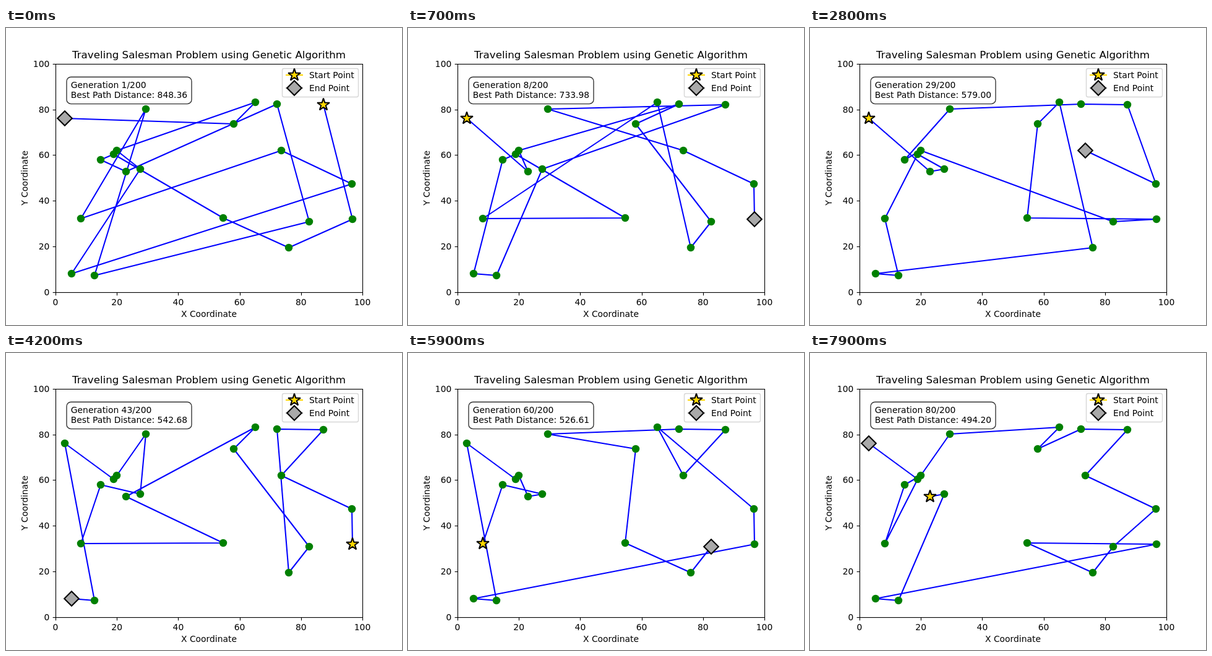
An HTML page with a canvas that plays this animation: 640 px wide and 480 px high, repeating every 8 s.

```html
<!DOCTYPE html>
<html lang="en">
<head>
<meta charset="utf-8">
<title>Traveling Salesman Problem</title>
<style>
html, body { margin: 0; width: 100%; height: 100%; overflow: hidden; background: #fff; }
canvas { display: block; }
</style>
</head>
<body>
<canvas id="stage" width="640" height="480"></canvas>
<script>
const ctx = document.getElementById('stage').getContext('2d');
const PT = 100 / 72;
const LOOP = 8000, STEP = 100;
const LEFT = 80, RIGHT = 576, TOP = 57.6, BOTTOM = 427.2;

const cities = {
  A: [226, 131], B: [403, 120], C: [438, 123], D: [513, 124], E: [368, 155],
  F: [95, 146], G: [153, 213], H: [174, 204], I: [179, 198], J: [194, 232],
  K: [217, 228], L: [121, 308], M: [106, 397], N: [143, 400], O: [351, 307],
  P: [457, 355], Q: [490, 313], R: [560, 309], S: [559, 252], T: [445, 198]
};

// Best tour and its length, from the given time on
const tours = [
  { at: 0, route: 'DRPOHGJCQNALTSMKIBEF', length: '848.36' },
  { at: 400, route: 'FJICEQPBLOHGMNKDATSR', length: '733.98' },
  { at: 1400, route: 'FJKHLNMPBEORQIGACDST', length: '579.00' },
  { at: 3200, route: 'RSTDCPQEBJOLGKAIHFNM', length: '542.68' },
  { at: 4400, route: 'LGKJIHFNMRSBTDCAEOPQ', length: '526.61' },
  { at: 6500, route: 'MNKHLFGJIABOSRQPCETD', length: '501.33' },
  { at: 7600, route: 'JKNMROPQSTDCEBAIGLHF', length: '494.20' }
];

function text(str, x, y, align = 'left', size = 10) {
  ctx.font = `${size * PT}px "DejaVu Sans", Verdana, sans-serif`;
  ctx.textAlign = align;
  ctx.fillStyle = '#000';
  ctx.fillText(str, x, y);
}

function polyline(points, color, width, join = 'round') {
  ctx.beginPath();
  points.forEach(([x, y]) => ctx.lineTo(x, y));
  ctx.strokeStyle = color;
  ctx.lineWidth = width;
  ctx.lineJoin = join;
  ctx.stroke();
}

function marker(x, y, count, radius, fill, join) {
  ctx.beginPath();
  for (let i = 0; i < count; i++) {
    const a = i * 2 * Math.PI / count - Math.PI / 2;
    const r = radius(i);
    ctx.lineTo(x + r * Math.cos(a), y + r * Math.sin(a));
  }
  ctx.closePath();
  ctx.fillStyle = fill;
  ctx.fill();
  ctx.strokeStyle = '#000';
  ctx.lineWidth = 1.5 * PT;
  ctx.lineJoin = join;
  ctx.stroke();
}

function star([x, y]) {
  const r = 7.5 * PT;
  marker(x, y, 10, i => i % 2 ? r * 0.381966 : r, '#ffd700', 'bevel');
}

function diamond([x, y]) {
  marker(x, y, 4, () => 6 * PT * Math.SQRT2, '#a9a9a9', 'miter');
}

function dot([x, y]) {
  ctx.beginPath();
  ctx.arc(x, y, 4.5 * PT, 0, 2 * Math.PI);
  ctx.fillStyle = '#008000';
  ctx.fill();
}

function panel(x, y, w, h, r, fill, edge) {
  ctx.beginPath();
  ctx.roundRect(x, y, w, h, r);
  ctx.fillStyle = fill;
  ctx.fill();
  ctx.strokeStyle = edge;
  ctx.lineWidth = PT;
  ctx.stroke();
}

function axes() {
  const snap = v => Math.round(v) + 0.5;
  const x0 = snap(LEFT), y0 = snap(BOTTOM);
  ctx.strokeStyle = '#000';
  ctx.lineWidth = 1.11;
  ctx.strokeRect(x0, snap(TOP), snap(RIGHT) - x0, snap(TOP) - y0 + 2 * (y0 - snap(TOP)));
  for (let v = 0; v <= 100; v += 20) {
    const x = LEFT + (RIGHT - LEFT) * v / 100;
    const y = BOTTOM - (BOTTOM - TOP) * v / 100;
    polyline([[snap(x), y0], [snap(x), y0 + 4.86]], '#000', 1.11);
    polyline([[x0, snap(y)], [x0 - 4.86, snap(y)]], '#000', 1.11);
    text(v, x, 448, 'center');
    text(v, 70.3, Math.round(y) + 5, 'right');
  }
  text('X Coordinate', 328, 467, 'center');
  ctx.save();
  ctx.translate(34.5, 242.4);
  ctx.rotate(-Math.PI / 2);
  text('Y Coordinate', 0, 0, 'center');
  ctx.restore();
  text('Traveling Salesman Problem using Genetic Algorithm', 328, 49, 'center', 12);
}

function legend() {
  panel(446.5, 65.5, 123, 46, 2.8, 'rgba(255,255,255,0.8)', 'rgba(204,204,204,0.8)');
  polyline([[452, 76], [480, 76]], '#ffd700', 1.5 * PT);
  star([466, 76]);
  polyline([[452, 97], [480, 97]], '#a9a9a9', 1.5 * PT);
  diamond([466, 97]);
  text('Start Point', 490, 81);
  text('End Point', 490, 102);
}

function draw(t) {
  const tour = tours.filter(p => p.at <= t).pop();
  const points = [...tour.route].map(k => cities[k]);
  ctx.fillStyle = '#fff';
  ctx.fillRect(0, 0, 640, 480);

  polyline(points, '#0000ff', 1.5 * PT);
  points.slice(1, -1).forEach(dot);
  star(points[0]);
  diamond(points[points.length - 1]);

  axes();
  panel(98, 79.2, 202, 43.4, 6.94, 'rgba(255,255,255,0.8)', 'rgba(0,0,0,0.8)');
  text(`Generation ${Math.floor(t / STEP) + 1}/200`, 104.8, 97);
  text(`Best Path Distance: ${tour.length}`, 104.8, 113);
  legend();
}

const begin = performance.now();
function tick() {
  draw((performance.now() - begin) % LOOP);
  requestAnimationFrame(tick);
}
tick();
</script>
</body>
</html>
```
